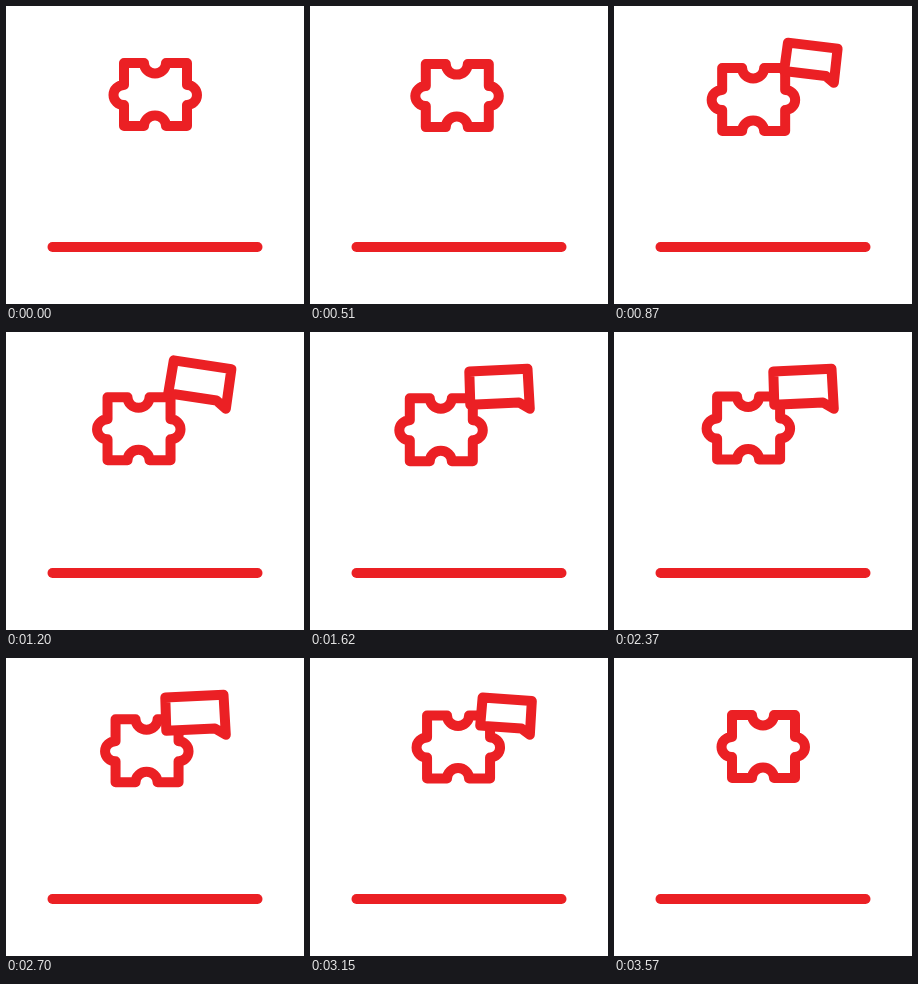
An HTML page for the animation above (3.6 s loop, 298 by 298 pixels).

```html
<!DOCTYPE html>
<html lang="en">
<head>
<meta charset="utf-8">
<title>Puzzle and speech bubble</title>
<style>
  html, body { margin: 0; width: 100%; height: 100%; overflow: hidden; background: #fff; }
  svg { display: block; width: 100vw; height: 100vh; }
  path {
    fill: #fff; stroke: #eb2024; stroke-width: 10;
    stroke-linecap: round; stroke-linejoin: round; vector-effect: non-scaling-stroke;
  }
</style>
</head>
<body>
<svg viewBox="0 0 298 298">
  <path d="M46.5 241H251.5"/>
  <path id="piece" d="M118 57H138A11 10.5 0 0 0 160 57H181V79A10 10 0 0 1 181 99V120H160A11 10.5 0 0 0 138 120H118V99A10.5 10 0 0 1 118 79Z"/>
  <path id="bubble" d="M159.3 39.5L217.5 36.8L219.8 76.8L209 70.5L160.3 72.8Z"/>
</svg>
<script>
  const LOOP = 3600;
  const piece = document.getElementById('piece');
  const bubble = document.getElementById('bubble');

  const part = (t, from, to) => Math.min(1, Math.max(0, (t - from) / (to - from)));
  const ease = p => (1 - Math.cos(Math.PI * p)) / 2;
  const ramp = (t, from, to) => ease(part(t, from, to));
  const arch = (t, from, to) => Math.sin(Math.PI * part(t, from, to));

  function draw(t) {
    const slide = ramp(t, 240, 1440) - ramp(t, 1990, 3350);
    const grow = ramp(t, 690, 930) - ramp(t, 3110, 3270);
    const tilt = 12 * arch(t, 570, 1600) + 8 * arch(t, 1630, 2330) + 8 * arch(t, 2710, 3350);

    piece.setAttribute('transform', `translate(${-18.2 * slide} ${9.2 * slide})`);
    bubble.setAttribute('visibility', grow > 0.01 ? 'visible' : 'hidden');
    bubble.setAttribute('transform', `translate(220 77) rotate(${tilt}) scale(${grow}) translate(-220 -77)`);
  }

  const start = performance.now();
  function tick() {
    draw((performance.now() - start) % LOOP);
    requestAnimationFrame(tick);
  }
  tick();
</script>
</body>
</html>
```
